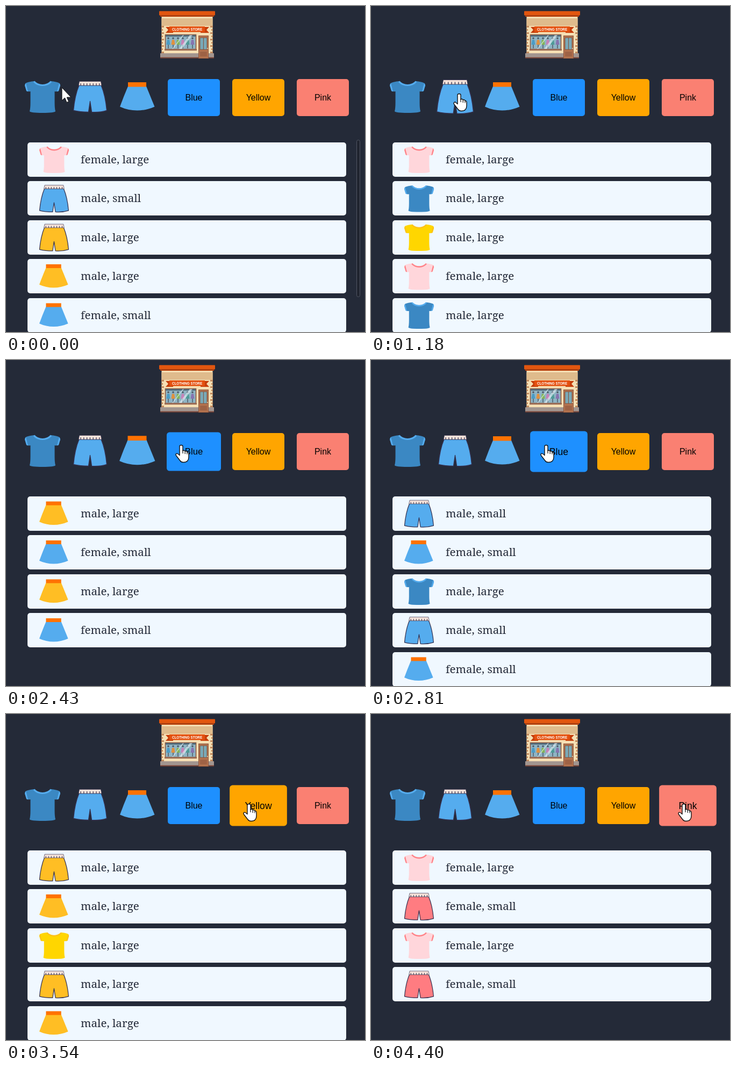
An HTML page for the animation above (4.47 s loop, 668 px wide and 607 px high).

```html
<!DOCTYPE html>
<html lang="en">
<head>
<meta charset="utf-8">
<title>Clothing store</title>
<style>
html, body { margin: 0; height: 100%; overflow: hidden; background: #242a38; }
svg { display: block; }
.item { transform-box: fill-box; transform-origin: center; }
.label { font: 16px "Liberation Sans", Arial, sans-serif; text-anchor: middle; }
.size { font: 20.6px "Noto Serif", serif; fill: #242a38; }
</style>
</head>
<body>
<svg width="668" height="607" viewBox="0 0 668 607">
  <g id="store"></g>
  <g id="filters"></g>
  <g id="list"></g>
  <rect id="scrollbar" x="652.5" y="249.5" width="6" height="292" rx="3" fill="#20242f" stroke="#505562"/>
  <g id="cursor" stroke="#111" stroke-linejoin="round" fill="#fff">
    <path id="arrow" d="M0 0V24L5.5 19L9 27.5L12.7 26L9.2 18H17Z"/>
    <g id="hand">
      <path stroke-width="1.4" d="M-3 3Q-3 .5 0 .5T3 3V11Q5.500 9 7.500 12Q10 10.500 11 13.500Q14 13 14 17V23Q14 27 11.500 30Q9 32.500 4 32.500Q0 32.500 -2 29.500L-9 20.500Q-11 17.500 -9 16.300Q-7 15.300 -3 19.500Z"/>
      <path fill="none" stroke-width="1.2" d="M3 10V16M7.200 12V17M11 13.500V17.500"/>
    </g>
  </g>
</svg>
<script>
const LOOP = 4470, FADE = 300;
const $ = id => document.getElementById(id);
const rect = (x, y, w, h, fill, more = '') =>
  `<rect x="${x}" y="${y}" width="${w}" height="${h}" fill="${fill}" ${more}/>`;
const path = (d, fill, more = '') => `<path d="${d}" fill="${fill}" ${more}/>`;
const range = (n, fn) => Array.from({ length: n }, (_, i) => fn(i)).join('');

// Garments are drawn from their own top left corner; b, y, p are the colours.
const shirtColors = { b: ['#3b88c3', '#55acee'], y: ['#ffd600', '#fcc21b'], p: ['#ffd6db', '#ff8489'] };
const fabric = { b: '#55acee', y: '#ffbe24', p: '#ff7c81' };

const garments = {
  t: { scale: .835, dy: 7, draw(color) {
    const [body, trim] = shirtColors[color];
    return path('M17 1Q8 2 3 4Q0 5 0 9L3 19Q6 21 10.500 20V40Q10.500 52 9 57Q10 60 33 60T57 57Q55.500 52 55.500 40V20Q60 21 63 19L66 9Q66 5 63 4Q58 2 49 1Q33 14 17 1Z', body)
      + path('M17 1.500Q23 8.500 33 8.500T49 1.500', 'none', `stroke="${trim}" stroke-width="3.2"`)
      + path('M1.500 5L0 9L3 19Q4 20.500 6 20L2.500 6ZM64.500 5L66 9L63 19Q62 20.500 60 20L63.500 6Z', trim);
  } },
  s: { scale: .87, dy: 6.5, draw(color) {
    const line = 'stroke="#33304f" stroke-width="1.4" stroke-linejoin="round"';
    return path('M11 8H52Q60 27 62.500 55Q50 59 34.500 58L31.500 38L28.500 58Q13 58 .5 55Q3 27 11 8Z', fabric[color], line)
      + path('M11.500 .8H51.500L53 8.500H10Z', '#f7e3da', 'stroke="#33304f" stroke-width=".8"')
      + path(range(7, i => `M${14 + i * 5.8} 4.500V8.500`), 'none', 'stroke="#33304f" stroke-width="1.2"');
  } },
  k: { scale: .83, dy: 9, draw(color) {
    return path('M15 8H49L64.500 46Q49 53 32 53T0 46Q6.500 28 15 8Z', fabric[color])
      + rect(15, .5, 34, 8.5, '#ff7200');
  } }
};

function drawStore() {
  const mannequins = ['#4a9cc6', '#e0913f', '#83b455', '#c583b8', '#4d9a97', '#8674b0'];
  return rect(289.5, 19, 95, 70, '#f6dfb4')
    + rect(289.5, 23, 95, 14, '#dfbb8c')
    + rect(285, 9.5, 104, 8, '#e2560f', 'rx="1"')
    + rect(287, 17.5, 100, 2.5, '#b9410c')
    + range(9, i => rect(289, 37 + i * 6, i % 2 ? 3 : 5, 3, '#c08a5f')
      + rect(i % 2 ? 382 : 380, 37 + i * 6, i % 2 ? 3 : 5, 3, '#c08a5f'))
    + path('M297 39H311V50H297L302 44.500ZM378 39H362V50H378L373 44.500Z', '#c53d0b')
    + rect(304, 38, 66, 10.5, '#e4500f')
    + `<text x="337" y="45.800" font-size="6.300" font-weight="700" font-family="Liberation Sans, sans-serif" fill="#fff" text-anchor="middle">CLOTHING STORE</text>`
    + rect(296.5, 53.5, 57, 27, '#8fb4c4', 'stroke="#8a5a44" stroke-width="1.6"')
    + rect(297, 54, 56, 3, '#536b7a')
    + range(6, i => `<circle cx="${302 + i * 9}" cy="60" r="1.800" fill="#4c5664"/>`
      + path(`M${300 + i * 9} 63h4l1.500 9h-7Z`, mannequins[i])
      + rect(301.3 + i * 9, 72, 1.4, 7, '#4c5664'))
    + path('M322 80L342 54H347L327 80ZM309 80L329 54H331L311 80Z', '#e9f6fa', 'opacity=".6"')
    + rect(295, 80, 60, 3, '#9b6b54')
    + rect(287, 88, 100, 8, '#a2958f')
    + rect(287, 95.5, 100, 2, '#7b4437')
    + rect(358.5, 55.5, 18, 42, '#b4734f', 'stroke="#8d563d"')
    + rect(361, 59, 13, 22, '#79a9b7', 'stroke="#80503b"')
    + rect(367, 59, 1, 22, '#80503b')
    + rect(361, 85, 13, 9, '#9e6245')
    + `<circle cx="375" cy="79" r="1" fill="#f6dfb4"/>`;
}

const button = (x, name, color) => `<g class="item">${rect(x, 136, 97, 69, color, 'rx="5"')}
  <text class="label" x="${x + 48.5}" y="176">${name}</text></g>`;
const icon = (kind, x, y) =>
  `<g transform="translate(${x} ${y})"><g class="item">${garments[kind].draw('b')}</g></g>`;

function row(code, i) {
  const [kind, color] = code, { scale, dy, draw } = garments[kind], y = 254 + i * 72.5;
  const sex = color === 'p' || code === 'kb' ? 'female' : 'male';
  const size = kind === 't' || color === 'y' ? 'large' : 'small';
  return rect(40, Math.floor(y), 593, 64, '#f0f8ff', 'rx="5"')
    + `<g transform="translate(62 ${y + dy}) scale(${scale})">${draw(color)}</g>`
    + `<text class="size" x="139" y="${Math.floor(y) + 39}">${sex}, ${size}</text>`;
}

$('store').innerHTML = drawStore();
$('filters').innerHTML = icon('t', 35, 139) + icon('s', 125, 139.5) + icon('k', 212, 141.5)
  + button(301, 'Blue', '#1e90ff') + button(421, 'Yellow', '#ffa500') + button(541, 'Pink', '#fa8072');
const items = [...document.querySelectorAll('.item')];

const lists = [
  [0, 'tp sb sy ky kb'], [500, 'tp tb ty tp tb'], [1250, 'sb sy sp sb sy'], [2100, 'ky kb ky kb'],
  [2810, 'sb kb tb sb kb'], [3540, 'sy ky ty sy ky'], [4240, 'tp sp tp sp']
];
// Enter and leave time of the pointer for each filter.
const hovers = [[100, 808], [867, 1532], [1577, 2304], [2355, 3115], [3150, 3780], [3830, LOOP]];
// Pointer moves: start, end, x, y.
const moves = [
  [0, 0, 104, 152], [60, 210, 84, 160], [730, 1000, 164, 163], [1440, 1720, 263, 156],
  [2250, 2425, 326, 158], [2950, 3250, 452, 167], [3570, 3950, 568, 173], [4400, 4400, 582, 167]
];

const clamp = v => Math.min(1, Math.max(0, v));
const smooth = p => p * p * (3 - 2 * p);

// The CSS "ease" curve, cubic-bezier(.25, .1, .25, 1).
function ease(x) {
  let lo = 0, hi = 1;
  for (let i = 0; i < 20; i++) {
    const s = (lo + hi) / 2;
    if (.75 * s * (1 - s) + s ** 3 < x) lo = s; else hi = s;
  }
  return .3 * lo * (1 - lo) ** 2 + 3 * lo * lo * (1 - lo) + lo ** 3;
}

function pointer(t) {
  let x = 0, y = 0;
  for (const [start, end, toX, toY] of moves) {
    if (t < start) break;
    const p = end > start ? smooth(clamp((t - start) / (end - start))) : 1;
    x += (toX - x) * p;
    y += (toY - y) * p;
  }
  return [x, y];
}

let shown;
function render(t) {
  const codes = lists.findLast(([start]) => t >= start)[1];
  if (codes !== shown) {
    shown = codes;
    $('list').innerHTML = codes.split(' ').map(row).join('');
  }
  $('scrollbar').style.display = t < 500 ? '' : 'none';
  hovers.forEach(([enter, leave], i) => {
    const grow = ease(clamp((t - enter) / FADE)) - ease(clamp((t - leave) / FADE));
    items[i].style.transform = `scale(${1 + grow / 10})`;
  });
  const over = hovers.some(([enter, leave]) => t >= enter && t < leave);
  $('hand').style.display = over ? '' : 'none';
  $('arrow').style.display = over ? 'none' : '';
  $('cursor').setAttribute('transform', `translate(${pointer(t)})`);
}

const began = performance.now();
function tick() {
  render((performance.now() - began) % LOOP);
  requestAnimationFrame(tick);
}
tick();
</script>
</body>
</html>
```
